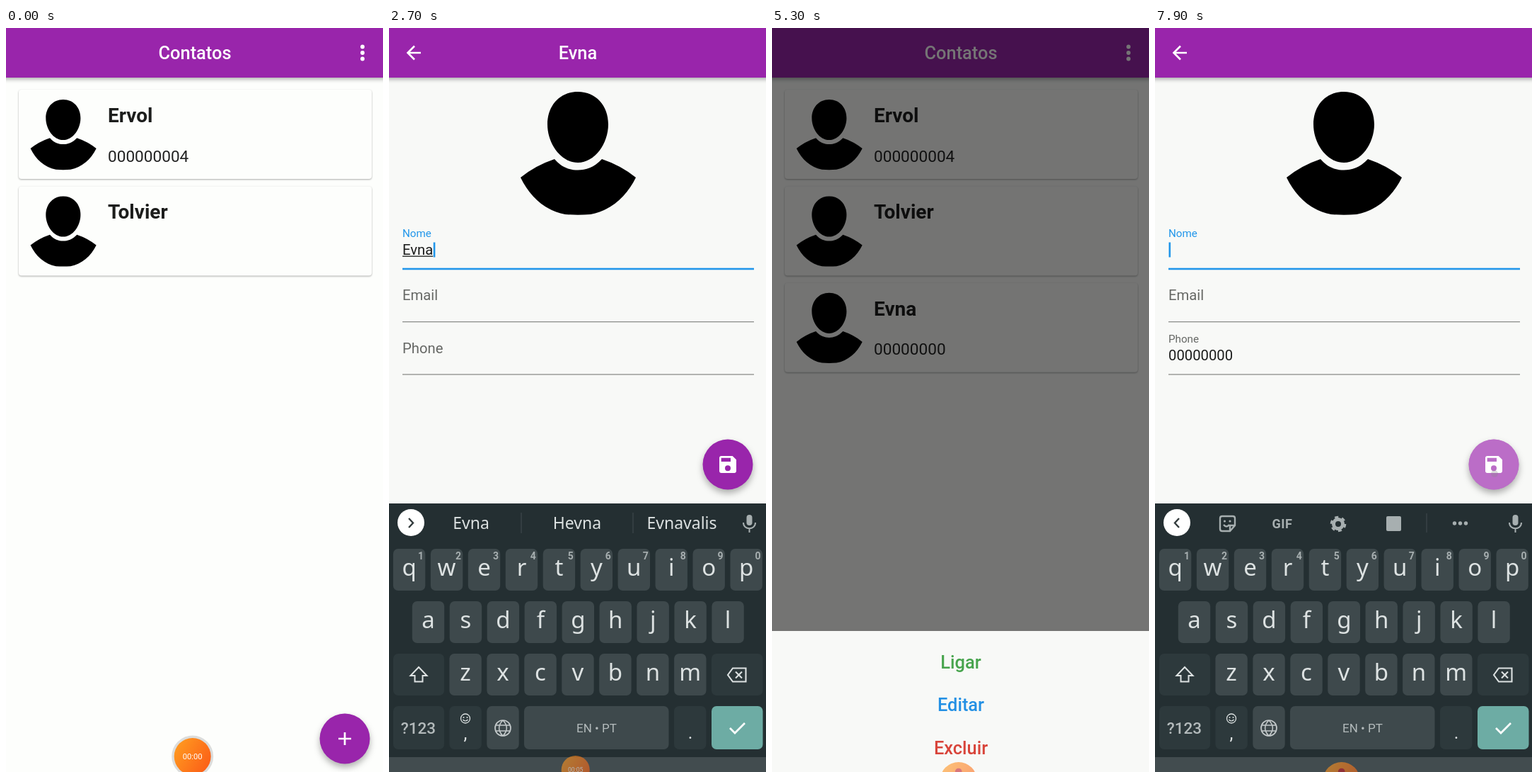
Animation, 533 px wide and 1050 px high, one loop 8000 ms. Source, as an HTML page:

```html
<!DOCTYPE html>
<html lang="pt">
<head>
<meta charset="utf-8">
<title>Contatos</title>
<style>
html, body { margin: 0; width: 100%; height: 100%; overflow: hidden; background: #fdfefc; }
svg { display: block; width: 533px; height: 1050px; overflow: hidden; }
text { font-family: Roboto, sans-serif; white-space: pre; }
.mid { text-anchor: middle; }
.med { font-weight: 500; }
.bold { font-weight: 700; }
.key { font-family: "Noto Sans", sans-serif; }
.bar { filter: drop-shadow(0 2px 3px rgba(0,0,0,.35)); }
.card { filter: drop-shadow(0 1px 1px rgba(0,0,0,.33)); }
.fab { filter: drop-shadow(0 5px 5px rgba(0,0,0,.3)); }
.ico { fill: none; stroke-width: 2.4; }
</style>
</head>
<body>
<svg id="stage" viewBox="0 0 533 1050" xmlns="http://www.w3.org/2000/svg"></svg>
<script>
const LOOP = 8000, PURPLE = '#9925ab', BLUE = '#2196ea', GREY = '#666865', LINE = '#8d8f8c';
const NAME = 'Evna', PHONE = '00000000';
const HINTS = ['', ['E', 'Eu', 'Em'], ['Ev', 'Eva', 'Evita'], ['Evn', 'Hevn', 'Evnal'], [NAME, 'Hevna', 'Evnavalis']];

// markup helpers
const text = (x, y, size, fill, s, cls = '', more = '') =>
  `<text x="${x}" y="${y}" font-size="${size}" fill="${fill}" class="${cls}" ${more}>${s}</text>`;
const rect = (x, y, w, h, fill, r = 0, more = '') =>
  `<rect x="${x}" y="${y}" width="${w}" height="${h}" rx="${r}" fill="${fill}" ${more}/>`;
const circle = (x, y, r, fill, more = '') => `<circle cx="${x}" cy="${y}" r="${r}" fill="${fill}" ${more}/>`;
const stroke = (d, color, more = '') => `<path class="ico" d="${d}" stroke="${color}" ${more}/>`;
const group = (id, body, more = '') => `<g id="${id}" ${more}>${body}</g>`;

const avatar = `<path d="M267 90C293 90 310 110 310 136C310 163 291 190 267 190C243 190 224 163 224 136C224 110 241 90 267 90Z
  M234 185C244 197 256 200.5 267 200.5S290 197 301 185Q328 194 349 211C336 238 313 258 285 263Q267 264.5 249 263C221 258 199 238 186 211Q207 194 234 185Z"/>`;
const saveIcon = `<path fill="#fff" transform="translate(-16 -16) scale(1.333)" d="M17 3H5c-1.1 0-2 .9-2 2v14c0 1.1.9 2 2 2h14c1.1 0 2-.9 2-2V7l-4-4zm-5 16a3 3 0 1 1 0-6a3 3 0 0 1 0 6zm3-10H5V5h10v4z"/>`;
const fab = (id, icon) => group(id, circle(0, 0, 35.5, PURPLE, 'class="fab"') +
  circle(0, 0, 35.5, '#fff', `id="${id}Glow" opacity="0"`) + icon);
const appBar = rect(-10, -40, 553, 110, PURPLE, 0, 'class="bar"');

function card(i, name, phone) {
  const y = 136.4 * i;
  return `<g id="card${i}" transform="translate(0 ${y})">` +
    rect(18, 87, 499, 126, '#fdfefc', 4, 'class="card"') +
    rect(18, 87, 499, 126, '#000', 4, `id="press${i}" opacity="0"`) +
    `<g transform="translate(-71.6 49.6) scale(.571)">${avatar}</g>` +
    text(144, 133, 28, '#1c1d1c', name, 'bold') + text(144, 188.5, 22.6, '#222', phone) + '</g>';
}

const listPage = rect(0, 0, 533, 1050, '#fdfefc') + card(0, 'Ervol', '000000004') + card(1, 'Tolvier', '') +
  card(2, NAME, PHONE) + appBar + text(267, 44, 25.4, '#fff', 'Contatos', 'mid med') +
  [26.5, 35, 43.5].map(y => circle(504, y, 2.9, '#fff')).join('') +
  fab('addFab', stroke('M-9 0H9M0 -9V9', '#fff', 'style="stroke-width:2.7"'));

const field = (id, y, label) => `<text id="${id}Label" x="19" fill="${GREY}">${label}</text>` +
  rect(19, y, 497, 1.3, LINE, 0, `id="${id}Line"`) + text(19, y - 20, 20.26, '#1b1c1b', '', '', `id="${id}Text"`);

const formPage = rect(0, -40, 533, 1130, '#f8f9f7') + `<g>${avatar}</g>` +
  field('name', 340, 'Nome') + field('mail', 414, 'Email') + field('phone', 489, 'Phone') +
  rect(19, 321.5, 0, 1.3, '#1b1c1b', 0, 'id="compose"') + rect(19, 302.5, 2.6, 21, BLUE, 0, 'id="caret"') +
  appBar + stroke('M45 35H27M36 25.5L26.5 35L36 44.5', '#fff', 'style="stroke-width:2.6"') +
  text(267, 44, 25.4, '#fff', '', 'mid med', 'id="title"') + fab('saveFab', saveIcon);

// keyboards
const INK = '#dde2e2', DIM = '#a7afb0', KEY = '#3e494c', DARK = '#2d393c', TEAL = '#6daca4';
const letterKey = (c, x, y) => rect(x, y, 45.4, 59, KEY, 7, `id="key_${c}"`) +
  text(x + 22.7, y + 38, 33, INK, c, 'mid key letter');
const row = (s, x, y) => [...s].map((c, i) => letterKey(c, x + i * 52.95, y)).join('');
const backspace = (x, y) => stroke(`M${x - 13} ${y}l7 -9.5h18.500v19h-18.500zM${x - 2} ${y - 4.5}l9 9m0 -9l-9 9`, INK, 'style="stroke-width:2.1"');
const check = (x, y) => stroke(`M${x - 10} ${y}l7 7l14 -14`, '#fff', 'style="stroke-width:2.7"');
const gear = circle(259, 700, 6.5, 'none', `stroke="${DIM}" stroke-width="5"`) +
  circle(259, 700, 9.6, 'none', `stroke="${DIM}" stroke-width="3.4" stroke-dasharray="5 5.05"`);
const tools = stroke('M34 692L28 698.500L34 705', '#333b3d') +
  stroke('M95 689h15q3 0 3 3v10l-7 8h-11q-3 0 -3 -3v-15q0 -3 3 -3zM113 702h-7v8M97 701q4 5 8 0', DIM) +
  circle(98.5, 696, 1.6, DIM) + circle(106, 696, 1.6, DIM) +
  text(180, 705.5, 18, DIM, 'GIF', 'mid bold', 'letter-spacing=".6"') + gear + rect(327, 689, 21, 21, DIM, 2) +
  rect(383.5, 685, 1, 27, '#424d50') + [423.5, 431.5, 439.5].map(x => circle(x, 699, 2.7, DIM)).join('');
const hints = stroke('M28 692L34 698.500L28 705', '#333b3d') + rect(186.5, 684, 1, 29, '#424d50') + rect(344.5, 684, 1, 29, '#424d50') +
  [116, 266, 414].map((x, i) => text(x, 707, 23, INK, '', 'mid key', `id="hint${i}"`)).join('');

const qwerty = rect(0, 671, 533, 500, '#242f32') + rect(0, 1029, 533, 200, '#424c4f') +
  circle(31, 698, 19, '#fff') + group('tools', tools) + group('hints', hints) +
  rect(505.5, 687, 8, 15, DIM, 4) + stroke('M501 698c0 11 17 11 17 0M509.500 706v6', DIM, 'style="stroke-width:2"') +
  row('qwertyuiop', 5.9, 735) + row('asdfghjkl', 32.8, 809) + row('zxcvbnm', 85.4, 883) +
  [...'1234567890'].map((d, i) => text(45 + i * 52.95, 750, 14, DIM, d, 'mid bold')).join('') +
  rect(6, 883, 72, 59, DARK, 7, 'id="shift"') + stroke('M42 902l-11.500 12h6v8.500h11v-8.500h6z', INK, 'style="stroke-width:2"') +
  rect(456, 883, 72.500, 59, DARK, 7, 'id="erase"') + backspace(492, 913) +
  rect(6, 957, 72, 61, DARK, 7) + text(41.5, 996, 22.5, '#b3babb', '?123', 'mid med') +
  rect(85.4, 957, 45.4, 61, DARK, 7) + circle(108, 974.5, 6.5, 'none', `stroke="${INK}" stroke-width="1.3"`) +
  circle(105.5, 973, 1, INK) + circle(110.5, 973, 1, INK) + stroke('M104.500 976q3.500 4 7 0', INK, 'style="stroke-width:1.2"') +
  text(108, 1004, 25, INK, ',', 'mid') +
  rect(138.3, 957, 45.4, 61, KEY, 7) + stroke('M150 988a11 11 0 1 0 22 0a11 11 0 1 0 -22 0M150.500 984h21M150.500 992h21M161 977c-7 7 -7 15 0 22c7 -7 7 -15 0 -22', '#c3c9ca', 'style="stroke-width:1.7"') +
  rect(191, 957, 204.500, 61, KEY, 7) + text(293.5, 994, 17, '#b3babb', 'EN • PT', 'mid') +
  rect(403, 957, 45.4, 61, DARK, 7) + text(426, 1003, 25, INK, '.', 'mid') +
  rect(456, 957, 72.5, 61, TEAL, 7) + check(492, 988);

const PAD = [['1', '', '2', 'ABC', '3', 'DEF'], ['4', 'GHI', '5', 'JKL', '6', 'MNO'], ['7', 'PQRS', '8', 'TUV', '9', 'WXYZ']];
const padKey = (c, r, fill, more) => rect(5 + c * 132.4, 736.5 + r * 73.2, 126.5, 65, fill, 7, more);
let numpad = rect(0, 728, 533, 500, '#2b383b') + rect(0, 1030.5, 533, 200, '#485153');
for (let r = 0; r < 4; r++) for (let c = 0; c < 4; c++)
  numpad += padKey(c, r, c < 3 ? '#454f52' : r < 3 ? '#324043' : '#71aea7', r === 3 && c === 1 ? 'id="zero"' : '');
PAD.forEach((cells, r) => {
  for (let c = 0; c < 3; c++) numpad += text(57 + c * 132.4, 783.5 + r * 73.2, 38, INK, cells[2 * c], 'mid') +
    text(99.500 + c * 132.4, 776 + r * 73.2, 17, '#b3babb', cells[2 * c + 1], 'mid');
});
numpad += text(68, 999, 28, INK, '* #', 'mid') + text(189.5, 1003, 38, INK, '0', 'mid') + text(232, 1000, 27, INK, '+', 'mid') +
  text(333, 1004, 32, INK, '.', 'mid') + stroke('M458 770H474', INK) + stroke('M455 840v5h22v-5', INK) +
  backspace(465.500, 916.500) + check(465.500, 990);

const sheet = rect(0, 851, 533, 400, '#f8f9f7') +
  [['Ligar', '#47a44d'], ['Editar', '#2390e4'], ['Excluir', '#d8443a']].map(([s, c], i) => text(267, 904 + i * 60.4, 25.4, c, s, 'mid med')).join('');

document.getElementById('stage').innerHTML =
  '<defs><linearGradient id="orange" x1="0" y1="0" x2="1" y2=".6"><stop offset=".2" stop-color="#ff941f"/><stop offset="1" stop-color="#fb6218"/></linearGradient></defs>' +
  group('list', listPage) + rect(0, 0, 533, 1050, '#000', 0, 'id="shade"') + group('sheet', sheet) + group('form', formPage) +
  group('qwerty', qwerty) + group('numpad', numpad) + circle(0, 0, 5, '#888', 'id="touch" opacity=".3"') +
  group('rec', circle(0, 0, 29.5, '#000', 'id="ring" opacity=".13"') + circle(0, 0, 26, 'url(#orange)') +
    text(0, 4, 11.2, '#fff', '', 'mid', 'id="clock"') + circle(0, -12.5, 4.8, '#c4202a', 'id="dot"'));

const el = {};
document.querySelectorAll('[id]').forEach(e => el[e.id] = e);
const letters = document.querySelectorAll('.letter');

// timing helpers
const clamp = (v, a = 0, b = 1) => Math.min(b, Math.max(a, v));
const ramp = (t, a, b) => clamp((t - a) / (b - a));
const within = (t, a, b) => t >= a && t < b;
const mix = (a, b, p) => a + (b - a) * p;
const count = (t, t0, step, n) => clamp(Math.floor((t - t0) / step) + 1, 0, n);
function bezier(x1, y1, x2, y2) {
  const f = (a, b, u) => 3 * a * u * (1 - u) ** 2 + 3 * b * u * u * (1 - u) + u ** 3;
  return x => {
    let lo = 0, hi = 1;
    for (let i = 0; i < 20; i++) { const m = (lo + hi) / 2; f(x1, x2, m) < x ? lo = m : hi = m; }
    return f(y1, y2, lo);
  };
}
const easeIn = bezier(.42, 0, 1, 1), swift = bezier(.4, 0, .2, 1);
const set = (id, attrs) => { for (const k in attrs) el[id].setAttribute(k, attrs[k]); };
const show = (id, on) => { el[id].style.display = on ? '' : 'none'; };
const move = (id, x, y, more = '') => set(id, { transform: `translate(${x} ${y}) ${more}` });
const say = (id, s) => { if (el[id].textContent !== s) el[id].textContent = s; };

const TAPS = [[100, 479, 1003], [900, 120, 312], [1440, 42, 913], [2900, 120, 452], [4380, 479, 680],
  [4960, 300, 425], [5780, 267, 955], [7860, 480, 629]];

function label(id, base, float, focused) {
  set(id + 'Label', { y: mix(base + 44, base + 29, float), 'font-size': mix(20.26, 15.2, float), fill: focused ? BLUE : GREY });
}

function render(t) {
  const editing = t >= 5000;
  const nameLen = editing ? 4 - count(t, 6880, 115, 4) : count(t, 1900, 190, 4);
  const phoneLen = editing ? 8 : count(t, 3450, 85, 8);
  const onName = within(t, 950, 2950) || t >= 6620, onPhone = within(t, 2950, 4480);

  // pages
  const page = editing ? ramp(t, 5900, 6060) : t < 3000 ? ramp(t, 330, 480) : 1 - ramp(t, 4500, 4640);
  show('form', page > 0);
  set('form', { opacity: easeIn(page) });
  move('form', 0, 272.5 * (1 - swift(page)));
  show('card2', t >= 4500);
  set('press2', { opacity: within(t, 4970, 5120) ? .1 : 0 });
  set('addFabGlow', { opacity: within(t, 110, 330) ? .3 * ramp(t, 100, 200) : 0 });
  set('saveFabGlow', { opacity: within(t, 4390, 4500) ? .3 * ramp(t, 4380, 4450) : .33 * ramp(t, 7800, 7890) });

  // bottom sheet
  const up = swift(ramp(t, 5070, 5220)) * (1 - swift(ramp(t, 5830, 5950)));
  set('shade', { opacity: .54 * up });
  move('sheet', 0, 200 * (1 - up));
  show('sheet', up > 0);

  // keyboards
  const hide = ramp(t, 4540, 4640), rise = swift(ramp(t, 950, 1060)), rise2 = swift(ramp(t, 6515, 6590));
  const words = within(t, 950, 3080) || t >= 6720;
  const digits = within(t, 3080, 4640) || within(t, 6515, 6720);
  show('qwerty', words);
  move('qwerty', 0, editing ? 0 : 379 * (1 - rise));
  show('numpad', digits);
  move('numpad', 0, editing ? 322 * (1 - rise2) : 95 * hide);
  set('numpad', { opacity: editing ? 1 : clamp(1 - 1.05 * hide) });
  move('addFab', 479, within(t, 4500, 4640) ? 1003 - 45 * (1 - hide) : 1003);
  move('saveFab', 479, editing ? (words ? 616 : mix(1003, 671, rise2)) : t < 3080 ? mix(1003, 616, rise) : 671);

  const typing = words && nameLen > 0 && t < 3080 || t >= 6720 && nameLen > 0;
  show('hints', typing);
  show('tools', !typing);
  if (typing) HINTS[nameLen].forEach((s, i) => say('hint' + i, s));
  const caps = within(t, 1480, 1900);
  letters.forEach(e => e.style.textTransform = caps ? 'uppercase' : 'none');
  set('shift', { fill: caps ? '#4a5659' : DARK });
  [...NAME.toLowerCase()].forEach((c, i) => set('key_' + c, { fill: within(t, 1900 + 190 * i, 1960 + 190 * i) ? '#566164' : KEY }));
  set('erase', { fill: within(t, 6860, 7420) ? '#465154' : DARK });
  set('zero', { fill: phoneLen && t < 4130 && (t - 3450) % 85 < 50 ? '#5d676a' : '#454f52' });

  // form
  const name = NAME.slice(0, nameLen);
  say('title', name || (editing ? '' : 'Novo contato'));
  say('nameText', name);
  say('phoneText', PHONE.slice(0, phoneLen));
  label('name', 266, editing ? 1 : ramp(t, 950, 1050), onName);
  label('mail', 340, 0, false);
  label('phone', 415, editing ? 1 : ramp(t, 2950, 3050), onPhone);
  set('nameLine', { fill: onName ? BLUE : LINE, height: onName ? 2.6 : within(t, 6515, 6620) ? 1.9 : 1.3, y: onName ? 338.7 : 339.3 });
  set('phoneLine', { fill: onPhone ? BLUE : LINE, height: onPhone ? 2.6 : 1.3, y: onPhone ? 487.7 : 488.3 });

  const nameWidth = nameLen ? el.nameText.getComputedTextLength() : 0;
  const width = onPhone ? (phoneLen ? el.phoneText.getComputedTextLength() : 0) : nameWidth;
  const composing = nameLen > 0 && (within(t, 1900, 2950) || t >= 6720);
  set('compose', { width: composing ? nameWidth : 0 });
  const marks = [980, 1900, 2090, 2280, 2500, 2950, 3450, 4045, 6515, 6880, 7225].filter(m => m <= t);
  const busy = within(t, 3450, 4045) || within(t, 6880, 7225);
  const blink = busy || Math.floor((t - marks[marks.length - 1]) / 250) % 2 === 0;
  show('caret', blink && (within(t, 980, 4480) || t >= 6515));
  set('caret', { x: 19.5 + width, y: onPhone ? 451.5 : 302.5 });

  // touch mark and floating recorder
  const tap = TAPS.find(p => within(t, p[0], p[0] + 110));
  show('touch', !!tap);
  if (tap) set('touch', { cx: tap[1], cy: tap[2] });
  const dock = ramp(t, 750, 900), tuck = t >= 3000;
  move('rec', 263.7, tuck ? 1062 : mix(1028, 1047, dock), `scale(${tuck ? 1 : mix(1, .77, dock)})`);
  set('rec', { opacity: mix(1, .6, dock) });
  show('ring', dock < 1);
  show('dot', tuck);
  show('clock', !tuck);
  say('clock', '00:0' + Math.floor(t / 500));
}

const start = performance.now();
function tick() {
  render((performance.now() - start) % LOOP);
  requestAnimationFrame(tick);
}
tick();
</script>
</body>
</html>
```
